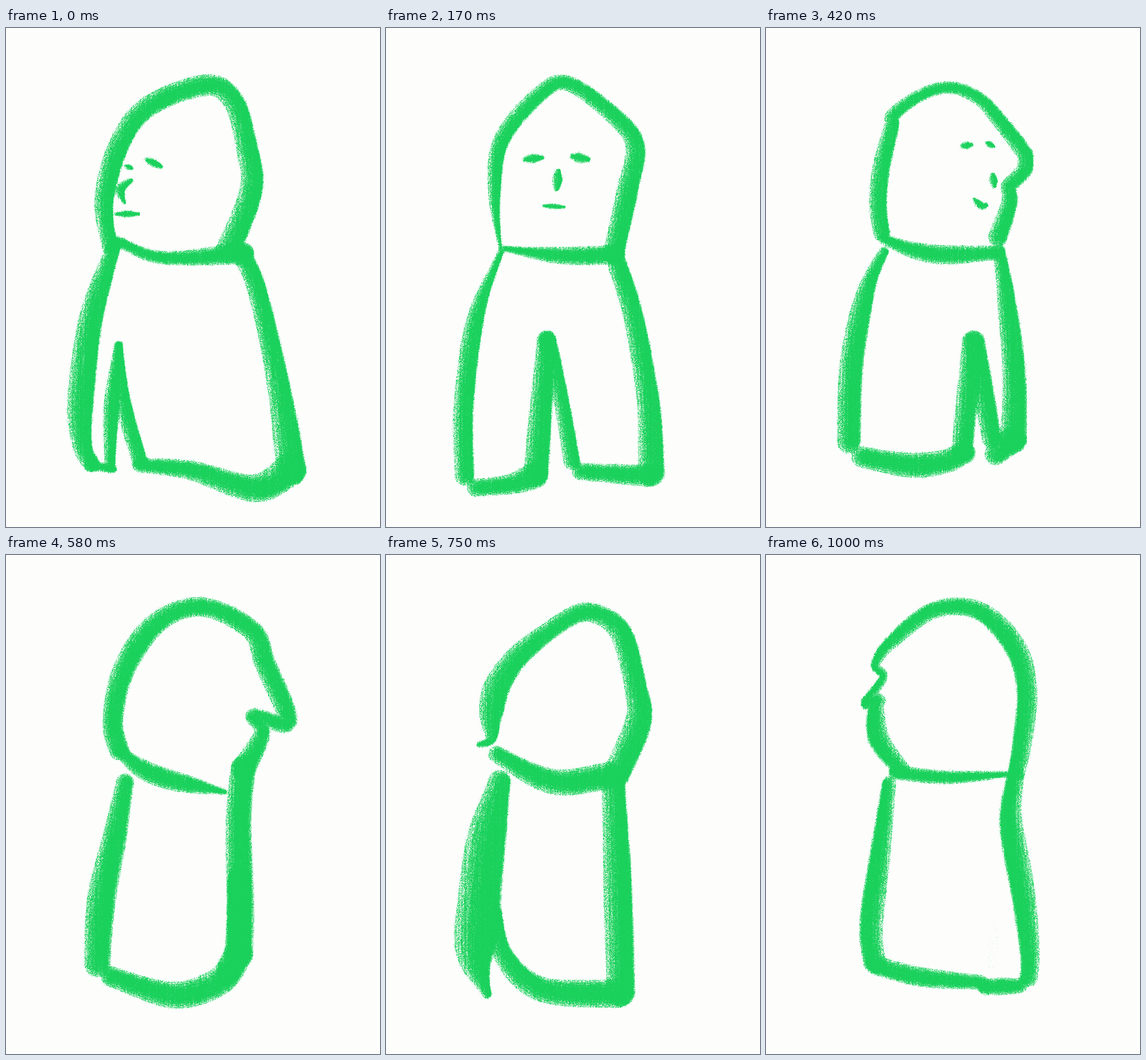
Animation, 648 px wide and 864 px high, one loop 1080 ms. Source, as an HTML page with a canvas:

```html
<!DOCTYPE html>
<html lang="en">
<head>
<meta charset="utf-8">
<title>Turning figure</title>
<style>
html, body { margin: 0; width: 100%; height: 100%; overflow: hidden; background: #fdfdfc; }
canvas { display: block; width: 648px; height: 864px; }
</style>
</head>
<body>
<canvas id="stage" width="648" height="864"></canvas>
<script>
const W = 648, H = 864, LOOP = 1080, SAMPLES = 140;
const INK = [26, 209, 92];

const lerp = (a, b, t) => a + (b - a) * t;

// Catmull-Rom curve through evenly timed values, t from 0 to 1.
function curve(values, t) {
  const last = values.length - 1, at = i => values[Math.max(0, Math.min(last, i))];
  const i = Math.min(Math.floor(t * last), Math.max(0, last - 1)), f = t * last - i;
  const a = at(i - 1), b = at(i), c = at(i + 1), d = at(i + 2);
  return b + 0.5 * f * (c - a + f * (2 * a - 5 * b + 4 * c - d + f * (3 * (b - c) + d - a)));
}

// A brush stroke: widths spread along the length of a smooth path.
function brush(widths, ...path) {
  const xs = path.filter((_, i) => i % 2 === 0), ys = path.filter((_, i) => i % 2);
  const fine = [], len = [0], count = 24 * xs.length;
  for (let i = 0; i <= count; i++) {
    fine.push([curve(xs, i / count), curve(ys, i / count)]);
    if (i) len.push(len[i - 1] + Math.hypot(fine[i][0] - fine[i - 1][0], fine[i][1] - fine[i - 1][1]));
  }
  let k = 1;
  return Array.from({ length: SAMPLES }, (_, n) => {
    const t = n / (SAMPLES - 1), want = t * len[count];
    while (k < count && len[k] < want) k++;
    const f = (want - len[k - 1]) / (len[k] - len[k - 1] || 1);
    return [lerp(fine[k - 1][0], fine[k][0], f), lerp(fine[k - 1][1], fine[k][1], f), curve(widths, t)];
  });
}

// A short straight touch of the brush, thickest in the middle.
function dab(x, y, length, width, tilt) {
  const reach = (length - width / 2) / 2, dx = reach * Math.cos(tilt), dy = reach * Math.sin(tilt);
  return brush([width / 2, width, width / 2], x - dx, y - dy, x + dx, y + dy);
}

// "bias" says towards which side the ink is densest.
const poses = [
  { // three quarters left
    bias: 0.8,
    head: brush([27, 35, 35, 36, 36, 39, 42], 180,378, 170,300, 195,205, 245,137, 345,99, 393,125, 416,200, 425,280, 385,385),
    neck: brush([18, 24, 36], 195,370, 250,394, 310,398, 412,390),
    left: brush([24, 38, 44, 44, 28], 188,376, 148,500, 129,650, 133,725, 148,754),
    right: brush([32, 36, 50], 408,392, 434,450, 469,600, 495,765),
    hemA: brush([18, 12], 145,757, 186,764),
    gapL: brush([14, 26, 18], 195,550, 183,650, 180,760),
    gapR: brush([14, 26, 26], 195,550, 204,650, 232,750),
    hemB: brush([24, 38, 54], 232,757, 320,766, 430,797, 492,765),
    eyeL: dab(213, 241, 16, 9, 0.4),
    eyeR: dab(256, 234, 34, 13, 0.45),
    nose: brush([8, 16, 5], 216,264, 198,280, 205,302),
    mouth: dab(210, 322, 44, 11, 0)
  },
  { // front
    bias: 0.8,
    head: brush([6, 24, 28, 26, 30, 36, 36], 198,380, 188,290, 200,195, 268,113, 318,97, 400,157, 432,205, 419,280, 395,388),
    neck: brush([10, 28, 32], 205,382, 300,394, 398,393),
    left: brush([10, 30, 34, 33], 199,388, 156,500, 135,650, 136,775),
    right: brush([33, 35, 39, 45], 402,412, 429,500, 455,650, 460,770),
    hemA: brush([30, 32, 44], 156,796, 215,790, 258,775),
    gapL: brush([30, 38, 42], 277,540, 270,640, 260,770),
    gapR: brush([30, 26, 28], 280,540, 303,640, 322,750),
    hemB: brush([28, 36], 337,768, 455,776),
    eyeL: dab(255, 226, 38, 15, -0.1),
    eyeR: dab(336, 225, 36, 17, 0.2),
    nose: dab(297, 263, 40, 17, 1.65),
    mouth: dab(291, 309, 40, 9, 0.05)
  },
  { // three quarters right
    bias: 0.8,
    head: brush([26, 27, 18, 14, 17, 23, 27, 28], 203,362, 199,290, 207,190, 204,163, 285,106, 350,125, 422,185, 428,220, 396,358),
    neck: brush([16, 30, 32], 207,380, 300,394, 400,379),
    left: brush([10, 32, 36, 38], 203,384, 163,450, 139,570, 136,720),
    right: brush([10, 28, 36, 43], 400,395, 422,470, 443,600, 443,725),
    hemA: brush([36, 40, 32], 158,750, 312,760),
    gapL: brush([33, 36], 332,533, 306,755),
    gapR: brush([33, 34, 30], 338,533, 362,630, 385,722),
    hemB: brush([36, 44], 405,746, 443,724),
    eyeL: dab(293, 213, 34, 14, -0.35),
    eyeR: dab(355, 211, 24, 10, 0.25),
    nose: dab(347, 257, 38, 16, 1.57),
    mouth: brush([7, 14, 10], 317,293, 335,308, 346,305)
  },
  { // profile right: face and leg gap have slid under the outline
    bias: 0.5,
    head: brush([34, 36, 39, 33, 33, 36, 34, 24, 40], 196,338, 185,285, 206,195, 262,117, 340,90, 425,130, 450,190, 488,288, 428,278, 444,308, 412,370),
    neck: brush([20, 34, 30, 10], 197,338, 230,367, 283,389, 378,410),
    left: brush([30, 42, 49, 44], 206,394, 190,480, 165,600, 158,708),
    right: brush([42, 45, 48], 411,370, 403,460, 406,610, 403,690),
    hemA: brush([34, 46, 48], 182,730, 290,762, 370,738, 403,690),
    gapL: brush([38], 405,560, 403,690),
    gapR: brush([38], 405,560, 403,690),
    hemB: brush([40], 385,722, 403,690),
    eyeL: dab(450, 185, 14, 10, 1.5),
    eyeR: dab(450, 185, 14, 10, 1.5),
    nose: dab(482, 277, 12, 10, 0),
    mouth: dab(444, 307, 12, 10, 1)
  },
  { // back, turned right
    bias: 0.8,
    head: brush([10, 44, 40, 32, 32, 38, 38, 46, 46], 162,328, 182,318, 182,275, 193,227, 222,183, 262,147, 322,106, 362,101, 407,135, 433,230, 437,290, 400,378),
    neck: brush([28, 42, 46], 192,345, 258,382, 310,394, 385,382),
    left: brush([38, 66, 73, 72, 16], 197,392, 173,500, 160,620, 155,700, 175,760),
    right: brush([40, 49, 48], 394,395, 401,560, 407,757),
    hemA: brush([22, 36, 44, 48], 190,620, 205,695, 270,752, 400,760)
  },
  { // back, turned left
    bias: 0.8,
    head: brush([6, 38, 40, 34, 40, 32, 32, 31, 37, 41, 46], 237,384, 202,345, 180,270, 174,226, 186,213, 176,194, 205,143, 310,95, 390,116, 447,175, 462,250, 450,325, 412,390),
    neck: brush([8, 38, 38, 36], 228,396, 290,413, 400,405),
    left: brush([22, 34, 40, 43], 199,422, 166,520, 145,600, 127,700),
    right: brush([44, 44, 47, 47], 406,425, 415,500, 422,610, 420,772),
    hemA: brush([38, 38, 20], 150,737, 226,737),
    hemB: brush([24, 44, 50], 238,744, 300,760, 420,770)
  },
  { // profile left
    bias: -0.6,
    head: brush([28, 36, 19, 15, 25, 28, 31, 37, 35, 34, 30], 235,372, 196,320, 190,265, 196,250, 172,257, 203,212, 190,190, 215,153, 290,96, 370,97, 432,160, 452,235, 443,330, 434,375),
    neck: brush([24, 23, 19, 10], 225,376, 310,385, 415,380),
    left: brush([24, 33, 40, 38], 213,396, 200,500, 182,640, 188,705),
    right: brush([30, 42, 39, 30], 432,385, 424,460, 446,590, 457,690, 455,732),
    hemA: brush([32, 32, 24], 195,712, 270,731, 372,740),
    hemB: brush([26, 28, 24], 380,748, 440,746),
    dust: dab(393, 680, 95, 16, 1.65)
  }
];

// start time, place along the poses
const steps = [
  [0, 0], [80, 0.5], [170, 1], [250, 1.5], [330, 2], [420, 2.35], [500, 2.7],
  [580, 3], [670, 3.5], [750, 4], [830, 5], [920, 5.5], [1000, 6]
];

function poseAt(place) {
  const i = Math.floor(place), t = place - i, from = poses[i], to = poses[i + 1];
  if (!t) return from;
  const pose = { bias: lerp(from.bias, to.bias, t) };
  for (const key in from)
    if (key !== 'bias' && to[key])
      pose[key] = from[key].map((p, n) => p.map((v, j) => lerp(v, to[key][n][j], t)));
  return pose;
}

function random(seed) {
  return () => {
    seed = (seed * 1664525 + 1013904223) >>> 0;
    return seed / 4294967296;
  };
}

// scale, grow, opacity: ink builds up from the rough rim to the solid core
const layers = [[1, 2.5, 0.22], [1, 0.5, 0.42], [0.84, 0, 0.35], [0.66, 0, 0.5], [0.45, 0, 0.7]];
const dustLayers = [[1, 0, 0.13]];

function layStroke(ctx, pts, bias, passes) {
  for (const [scale, grow, opacity] of passes) {
    ctx.globalAlpha = opacity;
    ctx.beginPath();
    for (const [x, y, w] of pts) {
      const r = w / 2, cx = x + bias * r * (1 - scale), cr = Math.max(0.5, r * scale + grow);
      ctx.moveTo(cx + cr, y);
      ctx.arc(cx, y, cr, 0, 7);
    }
    ctx.fill();
  }
}

function render(pose, seed) {
  const canvas = document.createElement('canvas');
  canvas.width = W;
  canvas.height = H;
  const ctx = canvas.getContext('2d', { willReadFrequently: true });
  for (const key in pose)
    if (key !== 'bias') layStroke(ctx, pose[key], pose.bias, key === 'dust' ? dustLayers : layers);

  // Paper grain: loose specks plus faint upright streaks.
  const rnd = random(seed), streak = Array.from({ length: W }, rnd);
  const img = ctx.getImageData(0, 0, W, H), d = img.data;
  for (let i = 0, n = 0; i < d.length; i += 4, n++) {
    if (!d[i + 3]) continue;
    const grain = 0.75 * rnd() + 0.25 * streak[n % W];
    const cover = (d[i + 3] / 255 - 0.7 * grain) * 2.8;
    [d[i], d[i + 1], d[i + 2]] = INK;
    d[i + 3] = 255 * Math.max(0, Math.min(1, cover));
  }
  ctx.putImageData(img, 0, 0);
  return canvas;
}

const drawings = steps.map(([, place], i) => render(poseAt(place), 71 + i * 977));
const stage = document.getElementById('stage').getContext('2d');
let shown = -1;

function show(time) {
  let i = steps.length - 1;
  while (steps[i][0] > time) i--;
  if (i === shown) return;
  shown = i;
  stage.fillStyle = '#fdfdfc';
  stage.fillRect(0, 0, W, H);
  stage.drawImage(drawings[i], 0, 0);
}

const start = performance.now();
function tick() {
  show((performance.now() - start) % LOOP);
  requestAnimationFrame(tick);
}
tick();
</script>
</body>
</html>
```
